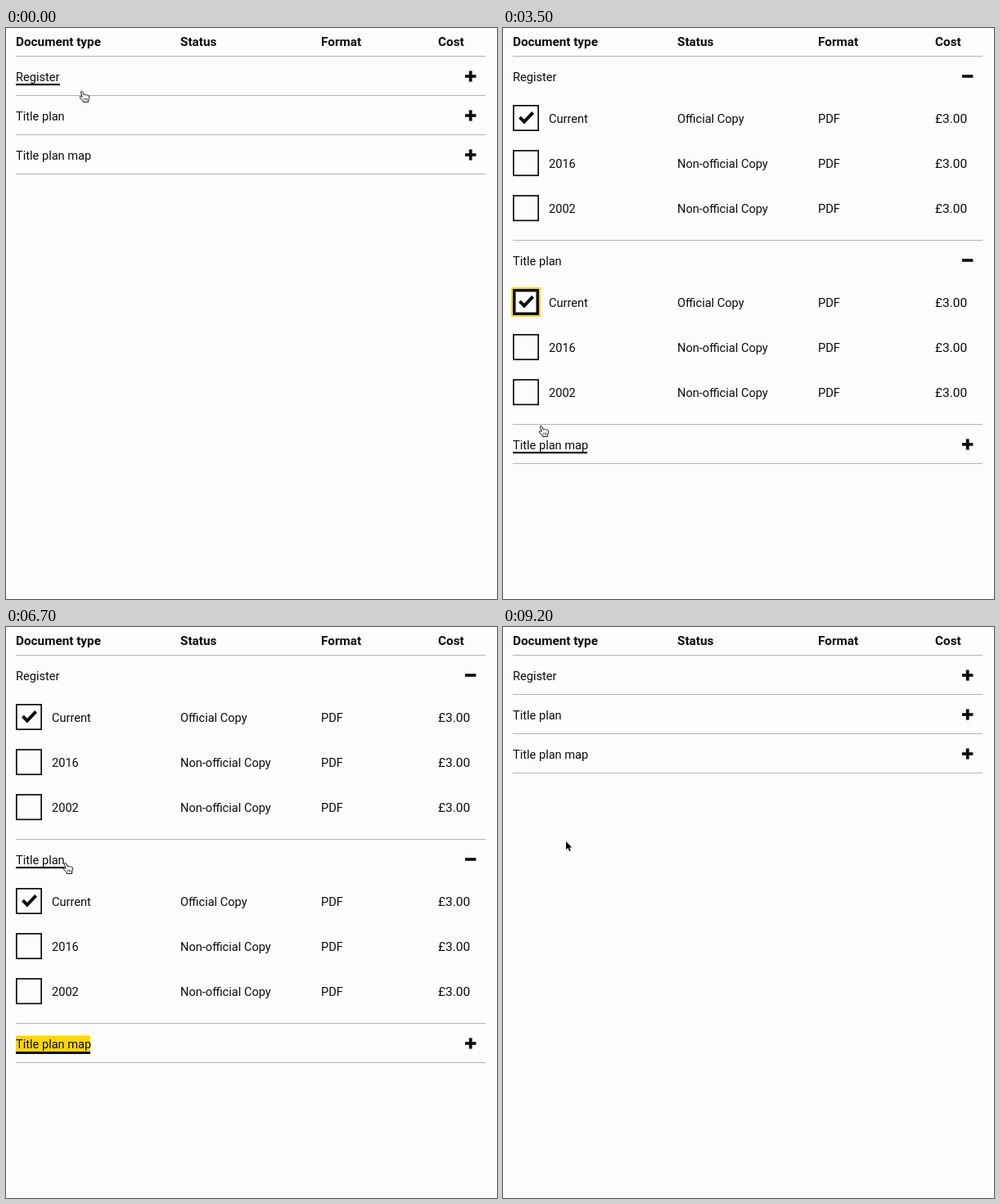
Write an HTML page that moves like this. It is 600 px wide and 698 px high and loops after 9300 ms.

```html
<!DOCTYPE html>
<html lang="en">
<head>
<meta charset="utf-8">
<title>Document picker</title>
<style>
  html, body { margin: 0; width: 100%; height: 100%; overflow: hidden; background: #fefdfe; }
  svg { display: block; }
  text { font: 14.6px Roboto, Arial, sans-serif; fill: #0b0c0c; }
  .head { font-weight: 700; font-size: 15.3px; }
  .price { font-size: 15.5px; }
</style>
</head>
<body>
<svg id="stage" width="600" height="698" viewBox="0 0 600 698"></svg>
<script>
const LOOP = 9300, STEP = 100;
const INK = '#0b0c0c', YELLOW = '#ffd60a', RULE = '#b1b4b6';
const ROW = 48, PANEL = 177;
const stage = document.getElementById('stage');

// Each section: label, label width, open and close times, tick time
const sections = [
  { label: 'Register', width: 54, open: 200, close: 8100, tick: 1300 },
  { label: 'Title plan', width: 59.5, open: 2300, close: 6900, tick: 3100 },
  { label: 'Title plan map', width: 91, open: 4000, close: 6300, tick: 5100 }
];
const items = [
  ['Current', 'Official Copy'],
  ['2016', 'Non-official Copy'],
  ['2002', 'Non-official Copy']
];

// Focused control over time: h = heading, c = checkbox
const focusSteps = [
  [0, ''], [100, 'h0'], [1200, 'c0'], [2200, 'h1'], [3000, 'c1'], [3900, 'h2'],
  [5000, 'c2'], [6200, 'h2'], [6800, 'h1'], [8000, 'h0'], [9100, '']
];

// Pointer tip: time, x, y
const path = [
  [0, 94, 77], [700, 94, 77], [1000, 30, 117], [1300, 30, 117],
  [2100, 60, 273], [2300, 60, 273], [2900, 30, 340], [3200, 30, 340],
  [3500, 48, 486], [3800, 51, 509], [4400, 51, 509], [4900, 30, 566],
  [5600, 30, 566], [6000, 55, 518], [6300, 58, 508], [6700, 74, 288],
  [7200, 78, 286], [7700, 70, 48], [8000, 72, 46], [8300, 80, 60],
  [8600, 80, 60], [9100, 77, 262], [9300, 77, 262]
];

function add(parent, tag, attrs, content) {
  const el = document.createElementNS(stage.namespaceURI, tag);
  for (const k in attrs) el.setAttribute(k, attrs[k]);
  if (content) el.textContent = content;
  parent.appendChild(el);
  return el;
}
const rect = (p, x, y, width, height, fill) => add(p, 'rect', { x, y, width, height, fill });
const text = (p, x, y, s, cls = '') => add(p, 'text', { x, y, class: cls }, s);
const show = (el, on) => el.setAttribute('visibility', on ? 'visible' : 'hidden');
const place = (el, x, y) => el.setAttribute('transform', `translate(${x} ${y})`);

[[12, 'Document type'], [213, 'Status'], [385, 'Format'], [528, 'Cost']]
  .forEach(([x, s]) => text(stage, x, 21.5, s, 'head'));
rect(stage, 12, 34, 574, 1, RULE);

function buildItem(panel, y, [name, status]) {
  const ring = rect(panel, 10, y - 2, 36, 36, YELLOW);
  rect(panel, 12, y, 32, 32, INK);
  const thin = rect(panel, 13.7, y + 1.7, 28.6, 28.6, '#fefdfe');
  const thick = rect(panel, 15.5, y + 3.5, 25, 25, '#fefdfe');
  const tick = add(panel, 'path', {
    d: `M20.5 ${y + 15.2}l5.4 5.5l10.7 -11.3`, fill: 'none', stroke: INK, 'stroke-width': 4
  });
  const base = y + 21.7;
  text(panel, 56, base, name);
  text(panel, 213, base, status);
  text(panel, 385, base, 'PDF');
  text(panel, 528, base, '£3.00', 'price');
  return { ring, thin, thick, tick };
}

sections.forEach(s => {
  s.group = add(stage, 'g', {});
  s.mark = rect(s.group, 12, 14.5, s.width, 20, YELLOW);
  s.bar = rect(s.group, 12, 34, s.width, 3, INK);
  s.line = rect(s.group, 12, 33, s.width, 2.2, INK);
  text(s.group, 12, 30.4, s.label);
  rect(s.group, 561, 22.2, 13.4, 3.6, INK);
  s.stem = rect(s.group, 565.8, 17.4, 3.8, 13.2, INK);
  s.panel = add(s.group, 'g', {});
  s.boxes = items.map((item, i) => buildItem(s.panel, 59 + i * 55.1, item));
  s.rule = rect(s.group, 12, 0, 574, 1, RULE);
});
// The last section keeps its rule under the heading
sections[2].panel.setAttribute('transform', 'translate(0 1)');

const hand = add(stage, 'g', { stroke: INK, 'stroke-width': 1, 'stroke-linejoin': 'round' });
add(hand, 'path', {
  fill: '#fff',
  d: 'M-2.6 1.6C-2.8 .2-.8-.2-.3 1.2L1.2 4.8C2 4 3.3 4.2 3.6 5C4.5 4.4 5.4 4.7 5.8 5.5' +
     'C6.9 5.1 7.6 5.9 7.6 7C7.7 9 7.2 10 6.6 11.2V13.4H.2V12.2C-1.2 10.8-2.2 9.3-3.6 8' +
     'C-4.2 6.8-2.8 6.1-1.3 7.2L-.8 7.2Z'
});
add(hand, 'path', { fill: 'none', 'stroke-width': .7, d: 'M1.6 8.6V11.4M3.4 8.6V11.4M5.2 8.6V11.4' });
const arrow = add(stage, 'path', {
  d: 'M0 0V10.2L2.3 8.1L4 12L5.9 11.2L4.2 7.4H7.2Z',
  fill: '#000', stroke: '#fff', 'stroke-width': .9, 'paint-order': 'stroke'
});

function pointerAt(t) {
  const i = Math.max(1, path.findIndex(k => k[0] >= t));
  const [t0, x0, y0] = path[i - 1], [t1, x1, y1] = path[i];
  const u = (t - t0) / (t1 - t0), e = u * u * (3 - 2 * u);
  return [x0 + (x1 - x0) * e, y0 + (y1 - y0) * e];
}

function draw(t) {
  const focus = focusSteps.filter(k => k[0] <= t).pop()[1];
  const [px, py] = pointerAt(t);
  let y = 35, overLink = false;

  sections.forEach((s, i) => {
    const open = t >= s.open && t < s.close;
    const hover = py >= y - 1 && py < y + ROW - 1;
    const focused = focus === 'h' + i;
    place(s.group, 0, y);
    show(s.mark, focused);
    show(s.bar, focused);
    show(s.line, hover && !focused);
    show(s.stem, !open);
    s.panel.style.display = open ? '' : 'none';
    s.boxes.forEach((b, n) => {
      const active = n === 0 && focus === 'c' + i;
      b.ring.style.display = active ? '' : 'none';
      b.thin.style.display = active ? 'none' : '';
      b.thick.style.display = active ? '' : 'none';
      b.tick.style.display = n === 0 && t >= s.tick ? '' : 'none';
      const mid = y + 75 + n * 55;
      if (open && px < 106 && Math.abs(py - mid) < 22) overLink = true;
    });
    overLink = overLink || hover;
    const last = i === sections.length - 1;
    s.rule.setAttribute('y', ROW - 1 + (open && !last ? PANEL : 0));
    y += ROW + (open ? PANEL : 0);
  });

  place(hand, px, py);
  place(arrow, px, py);
  show(hand, overLink);
  show(arrow, !overLink);
}

const start = performance.now();
function tick(now) {
  const t = Math.max(0, now - start) % LOOP;
  draw(Math.floor(t / STEP) * STEP);
  requestAnimationFrame(tick);
}
draw(0);
requestAnimationFrame(tick);
</script>
</body>
</html>
```
